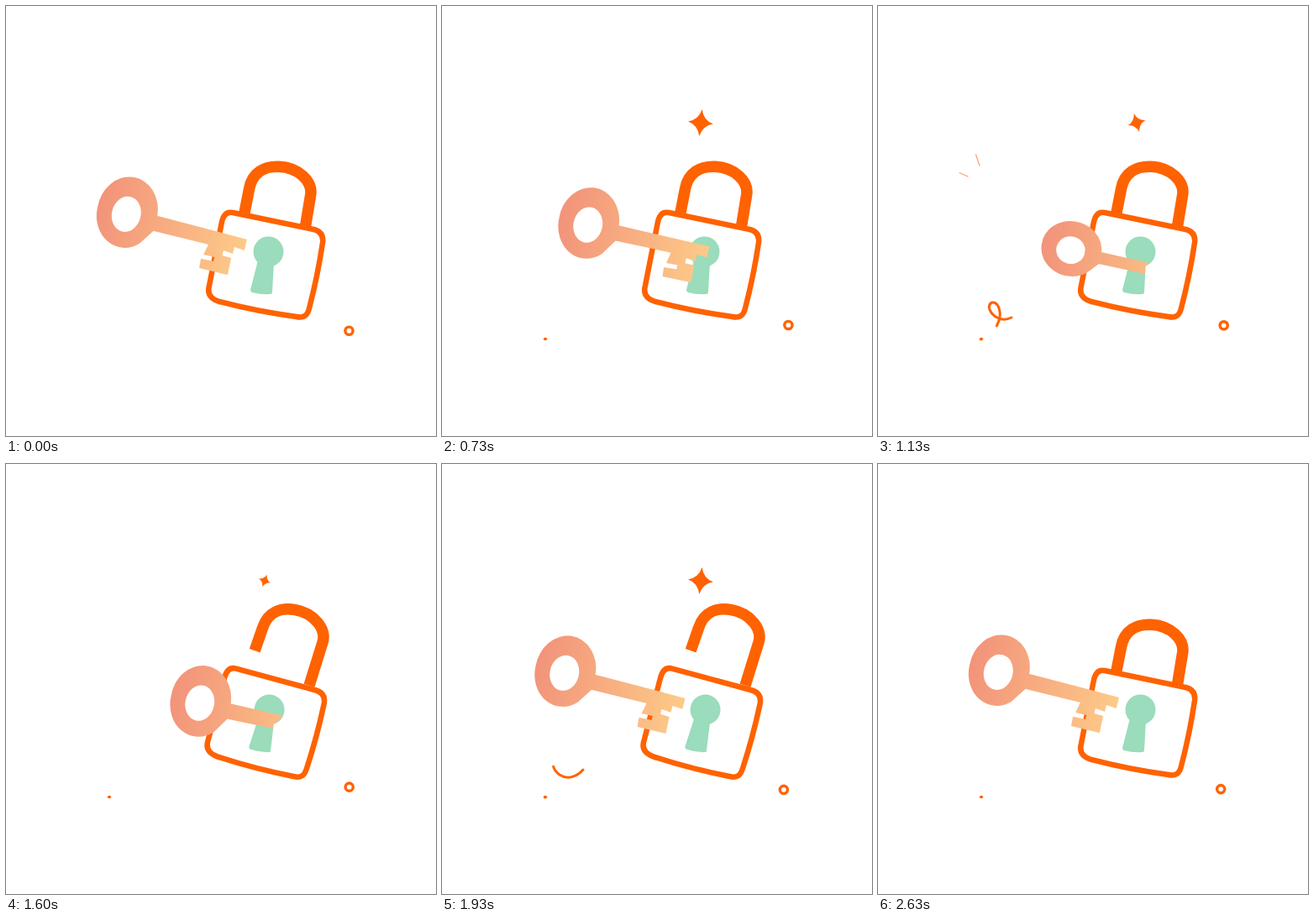
Write an HTML page that moves like this. It is 512 by 512 pixels and loops after 2.67 s.

```html
<!DOCTYPE html>
<html lang="en">
<head>
<meta charset="utf-8">
<title>Key and padlock</title>
<style>
  html, body { margin: 0; width: 100%; height: 100%; overflow: hidden; background: #fff; }
  svg { display: block; width: 100%; height: 100%; }
  .line { fill: none; stroke: #ff6200; stroke-linecap: round; }
</style>
</head>
<body>
<svg viewBox="0 0 512 512">
  <defs>
    <linearGradient id="gold" gradientUnits="userSpaceOnUse" x1="-36" y1="0" x2="146" y2="0">
      <stop offset="0" stop-color="#f2937a"/>
      <stop offset="1" stop-color="#fdca88"/>
    </linearGradient>
    <clipPath id="slot">
      <path d="M0 0H318V512H0Z"/>
      <circle cx="313" cy="292" r="18"/>
    </clipPath>
  </defs>

  <path id="shackle" class="line" stroke-width="13.500" style="stroke-linecap:butt"
    d="M284 246L289.500 218C293 198 308 190.500 325 191.200C348 192 366 209 362.500 226L354 278"/>
  <g id="body">
    <path d="M270 246L364 265.500Q379 268 377 282Q371 322 361 360Q358 373 346 370Q300 364 254 352Q238 347 242 333L257 257Q260 244 270 246Z"
      fill="#fff" stroke="#ff6200" stroke-width="6.500"/>
    <path d="M300 303L291 338Q291 340 293 341Q304 344 315 343Q317 343 317 341L319 305Z" fill="#9adcbb"/>
    <circle cx="312.500" cy="292.500" r="18" fill="#9adcbb"/>
  </g>

  <g clip-path="url(#slot)">
    <g id="key" fill="url(#gold)">
      <path fill-rule="evenodd" d="M-36 0A35.500 41 0 0 1 35.500 -7L35.500 11.500L23 30A35.500 41 0 0 1 -36 0ZM-18 0A17 21 0 0 0 16.500 0A17 21 0 0 0 -18 0Z"/>
      <path d="M35 -7L146 -5.500V7.800L133.600 7V15L122 14V20L133 20.400L133.800 41L99 41.300L98.200 30L113.500 29.400V24.300L100 24.500L102.800 11.400L35 11.500Z"/>
    </g>
  </g>

  <path id="star" fill="#ff6200" d="M0 -16Q3 -3 15 0Q3 3 0 16Q-3 3 -15 0Q-3 -3 0 -16Z"/>
  <circle id="ring" class="line" r="4.600" stroke-width="3.400"/>
  <path id="glint" class="line" stroke-width="1.200" opacity=".6" d="M116.500 177L121 190M97 198.500L107 203"/>
  <path id="curl" class="line" stroke-width="3" pathLength="1"
    d="M122.500 397C131 394 140 386 143 377C148 367 144 352 136 353C129 356 133 365 140 370C149 376 160 373 168 364"/>
  <ellipse id="dot" cx="123" cy="396.500" rx="2.200" ry="1.700" fill="#ff6200"/>
</svg>
<script>
const LOOP = 2670;
const $ = id => document.getElementById(id);
const put = (id, transform) => $(id).setAttribute('transform', transform);
const show = (id, on) => { $(id).style.display = on ? '' : 'none'; };
const clamp = x => Math.min(1, Math.max(0, x));
const ramp = (t, from, to) => clamp((t - from) / (to - from));
const ease = x => x < .5 ? 4 * x ** 3 : 1 - 4 * (1 - x) ** 3;
const swing = (t, peak) => Math.cos(2 * Math.PI * (t - peak) / LOOP);

function drawKey(t) {
  const back = ramp(t, 30, 550) ** 1.3, leave = ease(ramp(t, 1600, 2010));
  const dx = -32.5 * back + 120 * ease(ramp(t, 550, 906)) - 87.5 * leave;
  const tilt = 14 - 1.8 * (back - leave);
  const turn = 1 - .35 * Math.sin(Math.PI * ramp(t, 950, 1550)) ** 2;
  put('key', `translate(${144 + dx} ${248 + .42 * dx}) rotate(${tilt}) translate(0 ${27 * (1 - turn)}) scale(1 ${turn})`);
}

function drawLock(t) {
  const open = ease(ramp(t, 1330, 1500)) - ease(ramp(t, 2250, 2450));
  put('body', `rotate(${3.5 * open} 312 310)`);
  put('shackle', `translate(${3 * open} ${-20.5 * open}) rotate(${8 * open} 312 310)`);
}

function drawStar(t) {
  const age = t < 1400 ? t : t - 1145;
  const grow = ramp(age, 310, 610), shrink = ramp(age, 1070, 1290);
  const angle = 6 + 28 * (1 - grow) - 80 * shrink;
  put('star', `translate(308 139) rotate(${angle}) scale(${grow * (1 - shrink)})`);
}

function drawCurl(t) {
  const start = [468, 1070, 1802, 2300].findLast(s => s <= t);
  const age = t - start;
  const head = clamp(age / 68), tail = clamp((age - 20) / 180);
  show('curl', head > tail);
  $('curl').setAttribute('stroke-dasharray', `0 ${tail} ${head - tail} 2`);
  show('dot', t >= 468);
}

function frame(now) {
  const t = now % LOOP;
  drawKey(t);
  drawLock(t);
  drawStar(t);
  drawCurl(t);
  put('ring', `translate(${409.5 + 3 * swing(t, 820)} ${384.3 - 4.7 * swing(t, 900)})`);
  show('glint', t >= 1090 && t < 1200);
  requestAnimationFrame(frame);
}
frame(performance.now());
</script>
</body>
</html>
```
